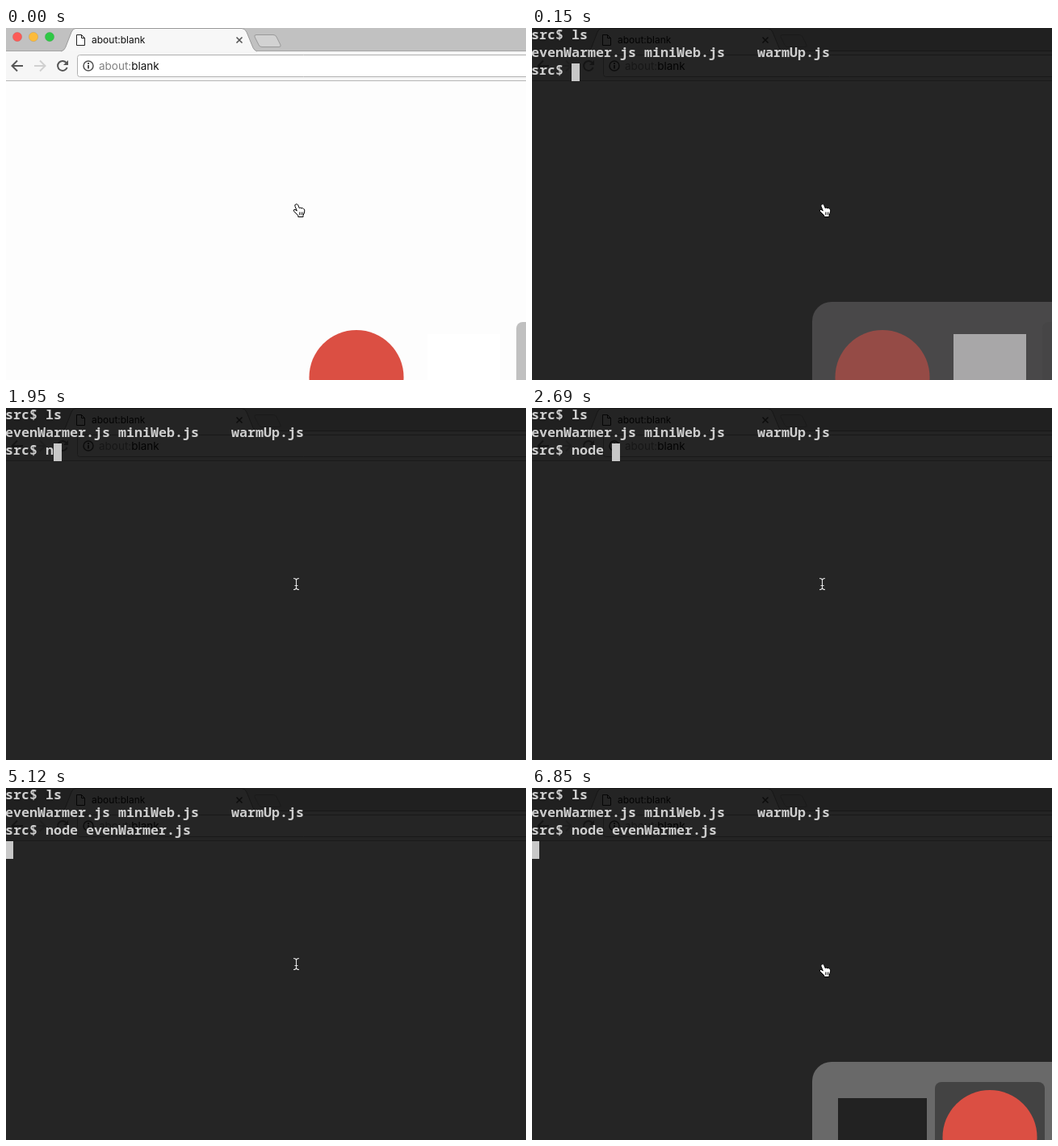
Write an HTML page with a canvas that moves like this. It is 644 px wide and 437 px high and loops after 8000 ms.

```html
<!DOCTYPE html>
<html lang="en">
<head>
<meta charset="utf-8">
<title>Terminal session</title>
<style>
  html, body { margin: 0; width: 100%; height: 100%; overflow: hidden; background: #252525; }
  canvas { display: block; width: 644px; height: 437px; }
</style>
</head>
<body>
<canvas id="stage" width="644" height="437"></canvas>
<script>
const ctx = document.getElementById('stage').getContext('2d');
const WIDTH = 644, HEIGHT = 437, LOOP = 8000;
const CELL = { x: -1, width: 10, height: 22 };
const COMMAND = 'node evenWarmer.js ';
const UI_FONT = 'Inter, "Open Sans", sans-serif';
const TERMINAL_FONT = '600 16.667px "Noto Sans Mono", "DejaVu Sans Mono", monospace';

// [time, value] pairs; the last one reached applies
const typing = [[0, 0], [1950, 1], [2090, 2], [2270, 3], [2480, 4], [2690, 5],
                [3020, 6], [3320, 7], [3770, COMMAND.length]];
const switcherFade = [[0, 1], [90, .78], [135, .52], [180, .3], [225, .12], [270, 0], [6850, 1]];
const at = (steps, time) => steps.filter(step => step[0] <= time).pop()[1];

function rect(x, y, w, h, color) {
  ctx.fillStyle = color;
  ctx.fillRect(x, y, w, h);
}

function shape(path, fill, stroke, lineWidth = 1) {
  const p = typeof path === 'string' ? new Path2D(path) : path;
  if (fill) { ctx.fillStyle = fill; ctx.fill(p); }
  if (stroke) { ctx.strokeStyle = stroke; ctx.lineWidth = lineWidth; ctx.stroke(p); }
}

function circle(x, y, r, fill, stroke, lineWidth) {
  const p = new Path2D();
  p.arc(x, y, r, 0, Math.PI * 2);
  shape(p, fill, stroke, lineWidth);
}

function rounded(x, y, w, h, r, fill, stroke) {
  const p = new Path2D();
  p.roundRect(x, y, w, h, r);
  shape(p, fill, stroke);
}

function label(text, x, y, font, color) {
  ctx.font = font;
  ctx.fillStyle = color;
  ctx.fillText(text, x, y);
  return x + ctx.measureText(text).width;
}

function drawBrowser(active) {
  const iconColor = active ? '#575757' : '#8c8c8c';
  rect(0, 0, WIDTH, HEIGHT, '#fdfdfd');
  rect(0, 0, WIDTH, 28, active ? '#c1c1c1' : '#dcdcdc');
  rect(0, 28, WIDTH, 38, '#f6f6f6');
  rect(0, 28, WIDTH, 1, '#a5a5a5');
  rect(0, 65, WIDTH, 1, '#b6b6b6');
  const lights = active ? ['#fc5b57', '#fdbb3a', '#2fc845'] : Array(3).fill('#d6d6d6');
  lights.forEach((color, i) => circle(14 + i * 20, 11, 5.7, color, 'rgba(0,0,0,.1)', .8));

  // tab and new-tab button
  shape('M68 29 Q72 28 73.5 24.5 L81 5 Q83 .5 86 .5 H292 Q296 .5 298 5 L306 24.5 Q307.5 28 311 29', '#f7f7f7', '#999');
  shape('M310 8.5 H331 Q334 8.5 335 11 L340 21 Q341 23.5 338 23.5 H317 Q314 23.5 313 21 L308 11 Q307 8.5 310 8.5Z',
        active ? '#d2d2d2' : '#e0e0e0', active ? '#999' : '#b4b4b4');
  shape('M87.5 8.5 H93.5 L97.5 12.5 V21.5 H87.5Z M93.5 8.5 V12.5 H97.5', '#fff', '#222');
  label('about:blank', 106, 19, '12px ' + UI_FONT, '#111');
  shape('M285.5 11.5 L292.5 18.5 M292.5 11.5 L285.5 18.5', null, '#555', 1.6);

  // navigation
  shape('M21 47 H8 M14 40.5 L7.5 47 L14 53.5', null, iconColor, 2);
  shape('M35 47 H48 M42 40.5 L48.5 47 L42 53.5', null, '#d0d0d0', 2);
  shape('M75 43.5 A6 6 0 1 0 75.7 49', null, iconColor, 2);
  shape('M77 40 V46 H71Z', iconColor);

  // address field
  rounded(88.5, 33.5, 570, 27, 3, '#fff', '#b0b0b0');
  circle(102, 47, 6, null, '#505050', 1.5);
  rect(101, 46, 2, 4.5, '#505050');
  rect(101, 43, 2, 2, '#505050');
  const font = '13.5px ' + UI_FONT;
  const end = label('about:', 115, 52, font, active ? '#808080' : '#989898');
  label('blank', end, 52, font, '#111');
}

function terminalLine(text, row) {
  ctx.font = TERMINAL_FONT;
  ctx.fillStyle = '#cdcdcd';
  [...text].forEach((char, i) =>
    ctx.fillText(char, CELL.x + i * CELL.width, row * CELL.height + 14));
}

function drawTerminal(time) {
  rect(0, 0, WIDTH, HEIGHT, 'rgba(0,0,0,.854)');
  const typed = at(typing, time), running = time >= 5120;
  terminalLine('src$ ls', 0);
  terminalLine('evenWarmer.js miniWeb.js    warmUp.js', 1);
  terminalLine('src$ ' + COMMAND.slice(0, typed), 2);
  const x = CELL.x + (running ? 0 : (5 + typed) * CELL.width);
  const y = (running ? 3 : 2) * CELL.height;
  if (time < 90) {
    ctx.strokeStyle = '#cbcbcb';
    ctx.lineWidth = 1;
    ctx.strokeRect(x + .5, y + .5, 9, 21);
  } else {
    rect(x, y, CELL.width, CELL.height, '#c8c8c8');
  }
}

function drawSwitcher(time) {
  const overPage = time < 30, returning = time >= 6850;
  ctx.save();
  ctx.globalAlpha = at(switcherFade, time);
  if (!overPage) rounded(347, 340, 400, 200, 24, returning ? '#696969' : '#6a686a');
  rounded(returning ? 499 : 632, 365, 136, 150, 8, overPage ? '#c0c0c0' : '#434343');
  if (returning) {
    rect(379, 385, 110, 110, '#222');
    circle(567, 433.5, 58.5, '#db4f43');
  } else {
    circle(434, 433.5, 58.5, '#db4f43');
    rect(522, 380, 90, 90, '#fff');
  }
  ctx.restore();
}

function drawPointer(time) {
  if (time < 270 || time >= 6440) {
    shape('M358.5 219 Q360.8 217.8 361.8 220 L363.2 223.6 Q364.8 222.3 366 223.8 Q367.6 222.8 368.4 224.6 ' +
          'Q370 224.4 369.8 227 L369.3 230 L368 232.3 V234.5 H361.8 V232.8 L356.6 227.6 Q355.4 225.2 358 225.4 ' +
          'L360.3 227 L358 221.4 Q357.4 219.8 358.5 219Z', '#fff', '#000');
    shape('M363.5 228.5 V232 M365.5 228.5 V232 M367.5 228.5 V232', null, '#000', .8);
  } else {
    shape('M356 211.5 Q359 211.5 359.5 213.5 Q360 211.5 363 211.5 M359.5 213 V224 ' +
          'M356 225.5 Q359 225.5 359.5 223.5 Q360 225.5 363 225.5 M357.5 220.5 H361.5', null, '#e4e4e4', 1.1);
  }
}

function render(now) {
  const time = now % LOOP;
  drawBrowser(time < 30);
  if (time >= 30) drawTerminal(time);
  drawSwitcher(time);
  drawPointer(time);
}

const start = performance.now();
function tick() {
  render(performance.now() - start);
  requestAnimationFrame(tick);
}
tick();
</script>
</body>
</html>
```
